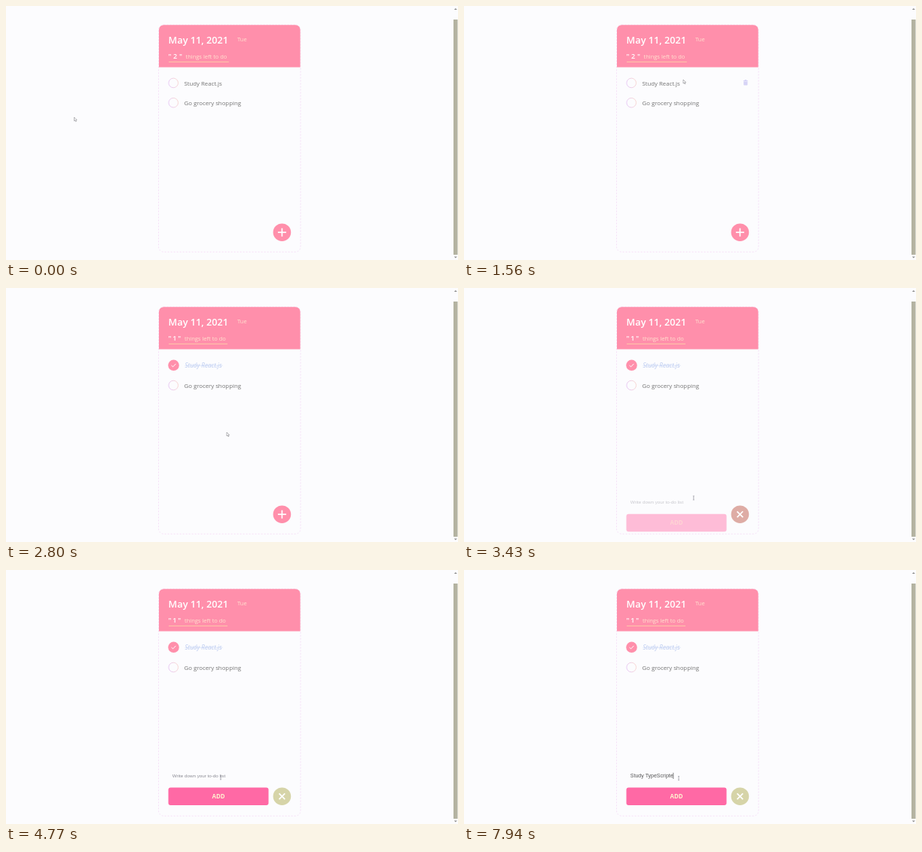
Write an HTML page with a canvas that moves like this. It is 600 px wide and 338 px high and loops after 8000 ms.

```html
<!DOCTYPE html>
<html lang="en">
<head>
<meta charset="utf-8">
<title>To-do list</title>
<style>
  html, body { margin: 0; width: 100%; height: 100%; overflow: hidden; background: #fcfcfe; }
  canvas { display: block; width: 600px; height: 338px; }
</style>
</head>
<body>
<canvas id="stage"></canvas>
<script>
const LOOP = 8000, W = 600, H = 338;
const BG = '#fcfcfe', PINK = '#ff8fab', CREAM = '#ffe3cf', GREY = '#747474';
const UI = '"Open Sans", "Noto Sans", sans-serif';
const FIELD = '"Liberation Sans", Arial, sans-serif';
const CHECK_AT = 2510, OPEN_AT = 3200, TYPE_AT = 5050;
const TYPED = 'Study TypeScripte';

const canvas = document.getElementById('stage');
const ctx = canvas.getContext('2d');
const ratio = window.devicePixelRatio || 1;
canvas.width = W * ratio;
canvas.height = H * ratio;

// Mouse stops: time, x, y
const PATH = [
  [30, 90.5, 148], [780, 236, 122], [1200, 280, 104], [1500, 291, 98],
  [1700, 291, 98], [2300, 223, 101], [2520, 223, 102], [2800, 293, 192],
  [3080, 366, 301], [3260, 366, 301], [3630, 228, 252], [4000, 231, 256],
  [4250, 240, 270], [4700, 285, 276], [5000, 285, 277]
];
const PLUS_COLORS = [
  [OPEN_AT, 255, 143, 171], [3500, 217, 176, 164],
  [3750, 217, 178, 164], [4050, 214, 212, 168]
];

const clamp = v => Math.max(0, Math.min(1, v));
const ease = v => { v = clamp(v); return v * v * (3 - 2 * v); };

function along(stops, t) {
  const next = stops.findIndex(s => s[0] > t);
  if (next === 0) return stops[0].slice(1);
  if (next < 0) return stops[stops.length - 1].slice(1);
  const a = stops[next - 1], b = stops[next];
  const k = ease((t - a[0]) / (b[0] - a[0]));
  return a.slice(1).map((v, i) => v + (b[i + 1] - v) * k);
}

function text(str, x, y, font, color, align = 'left') {
  ctx.font = font;
  ctx.fillStyle = color;
  ctx.textAlign = align;
  ctx.fillText(str, x, y);
}

function line(points, color, width) {
  ctx.beginPath();
  points.forEach(([x, y]) => ctx.lineTo(x, y));
  ctx.strokeStyle = color;
  ctx.lineWidth = width;
  ctx.stroke();
}

function box(x, y, w, h, radius, color) {
  ctx.beginPath();
  ctx.roundRect(x, y, w, h, radius);
  ctx.fillStyle = color;
  ctx.fill();
}

function disc(x, y, r, color) {
  ctx.beginPath();
  ctx.arc(x, y, r, 0, Math.PI * 2);
  ctx.fillStyle = color;
  ctx.fill();
}

function ring(x, y) {
  const g = ctx.createLinearGradient(x - 6, y, x + 6, y - 3);
  g.addColorStop(0, '#e6c4f3');
  g.addColorStop(1, '#f7d2cd');
  ctx.beginPath();
  ctx.arc(x, y, 6.3, 0, Math.PI * 2);
  ctx.strokeStyle = g;
  ctx.lineWidth = 0.9;
  ctx.stroke();
}

function triangle(x, y, dir) {
  ctx.beginPath();
  ctx.moveTo(x - 2, y + dir);
  ctx.lineTo(x + 2, y + dir);
  ctx.lineTo(x, y - dir);
  ctx.fillStyle = '#8a8a8a';
  ctx.fill();
}

function drawScrollbar() {
  box(594, 18, 5.5, 313, 0, '#b4b3a1');
  triangle(596.8, 4, 1);
  triangle(596.8, 334.5, -1);
}

function drawCard() {
  ctx.beginPath();
  ctx.roundRect(202.5, 25, 188.5, 302.3, 7);
  ctx.setLineDash([2, 2]);
  ctx.strokeStyle = '#f4d9f6';
  ctx.lineWidth = 0.8;
  ctx.stroke();
  ctx.setLineDash([]);
}

function drawHeader(checked) {
  box(203, 25.2, 187.6, 56.3, [6.5, 6.5, 0, 0], PINK);
  text('May 11, 2021', 215.6, 49.6, '600 12.7px ' + UI, '#fff');
  text('Tue', 307, 47.2, '7.5px ' + UI, CREAM);
  const bold = '600 9px ' + UI;
  text('"', 215.5, 70.2, bold, '#fff');
  text(checked ? '1' : '2', checked ? 221.2 : 222, 69.6, bold, '#fff');
  text('"', checked ? 228.3 : 230, 70.2, bold, '#fff');
  text('things left to do', checked ? 237 : 238.5, 69.7, '7.5px ' + UI, CREAM);
  line([[216, 74.4], [checked ? 294 : 295.8, 74.4]], '#fdd0a8', 0.9);
}

function drawTrash() {
  const color = '#d6d3f6';
  box(370.8, 99, 6, 1.3, 0.4, color);
  box(372.6, 97.9, 2.4, 1.2, 0.4, color);
  box(371.2, 100.6, 5.2, 4.9, 0.7, color);
}

function drawItems(checked, hover) {
  const font = '7.8px ' + UI;
  if (checked) {
    disc(222.5, 102.8, 7.3, PINK);
    line([[219.6, 103], [221.6, 104.9], [225.4, 100.9]], '#fff', 1);
    text('Study React.js', 237.5, 105.8, 'italic 8.1px ' + UI, '#bccbf0');
    line([[237.5, 103.3], [287.5, 103.3]], '#c3d0f2', 0.6);
  } else {
    ring(222.2, 102.4);
    text('Study React.js', 236.5, 105.8, font, GREY);
  }
  const drop = checked ? 0.8 : 0;
  ring(222.2, 128.7 + drop);
  text('Go grocery shopping', 236.5, 131.8 + drop, font, GREY);
  if (hover) drawTrash();
}

function typedCount(t) {
  if (t < TYPE_AT) return 0;
  const fast = 1 + Math.floor((t - TYPE_AT) / 130);
  if (fast <= 10) return fast;
  return Math.min(TYPED.length, 10 + Math.max(0, Math.floor((t - 6210) / 230)));
}

function drawField(t) {
  const count = typedCount(t);
  if (!count) {
    text('Write down your to-do list', 220.8, 276.2, '6.25px ' + FIELD, '#8c8c94');
  } else {
    text(TYPED.slice(0, count), 220.8, 276.3, '7px ' + FIELD, '#555');
  }
  if (t > 4900) {
    const x = 221 + (count ? ctx.measureText(TYPED.slice(0, count)).width : 0);
    line([[x, 269.8], [x, 278]], '#444', 0.7);
  }
}

function drawForm(t) {
  const k = ease((t - OPEN_AT - 130) / 220);
  if (!k) return;
  ctx.save();
  ctx.globalAlpha = k;
  ctx.translate(0, (1 - k) * 20);
  box(215.5, 289.5, 133, 23.5, 3, '#ff69a5');
  text('ADD', 282, 304, 'bold 7.9px ' + UI, '#fff3d0', 'center');
  drawField(t);
  ctx.restore();
}

function drawPlus(t) {
  const [r, g, b] = along(PLUS_COLORS, t);
  ctx.save();
  ctx.translate(366.4, 301.2);
  disc(0, 0, 11.8, `rgb(${r}, ${g}, ${b})`);
  ctx.rotate(ease((t - OPEN_AT) / 250) * Math.PI / 4);
  line([[-5.5, 0], [5.5, 0]], '#fff', 1.7);
  line([[0, -5.5], [0, 5.5]], '#fff', 1.7);
  ctx.restore();
}

function drawMouse(x, y, inField) {
  ctx.save();
  ctx.translate(x, y);
  if (inField) {
    line([[0, -2.3], [0, 2.6]], '#8d8d97', 0.7);
    line([[-1, -2.5], [1, -2.5]], '#8d8d97', 0.6);
    line([[-1, 2.7], [1, 2.7]], '#8d8d97', 0.6);
  } else {
    ctx.beginPath();
    [[0, 0], [0, 5], [1.2, 4], [2, 5.8], [2.9, 5.4], [2.1, 3.7], [3.6, 3.6]]
      .forEach(p => ctx.lineTo(...p));
    ctx.closePath();
    ctx.fillStyle = '#fff';
    ctx.fill();
    ctx.strokeStyle = '#85858a';
    ctx.lineWidth = 0.6;
    ctx.stroke();
  }
  ctx.restore();
}

function draw(t) {
  const checked = t >= CHECK_AT;
  const [x, y] = along(PATH, t);
  const hover = x > 215 && x < 378 && y > 92 && y < 114;
  ctx.setTransform(ratio, 0, 0, ratio, 0, 0);
  ctx.fillStyle = BG;
  ctx.fillRect(0, 0, W, H);
  drawScrollbar();
  drawCard();
  drawHeader(checked);
  drawItems(checked, hover);
  drawForm(t);
  drawPlus(t);
  drawMouse(x, y, t > OPEN_AT && y > 265 && x < 348);
}

function tick() {
  draw(performance.now() % LOOP);
  requestAnimationFrame(tick);
}
tick();
</script>
</body>
</html>
```
